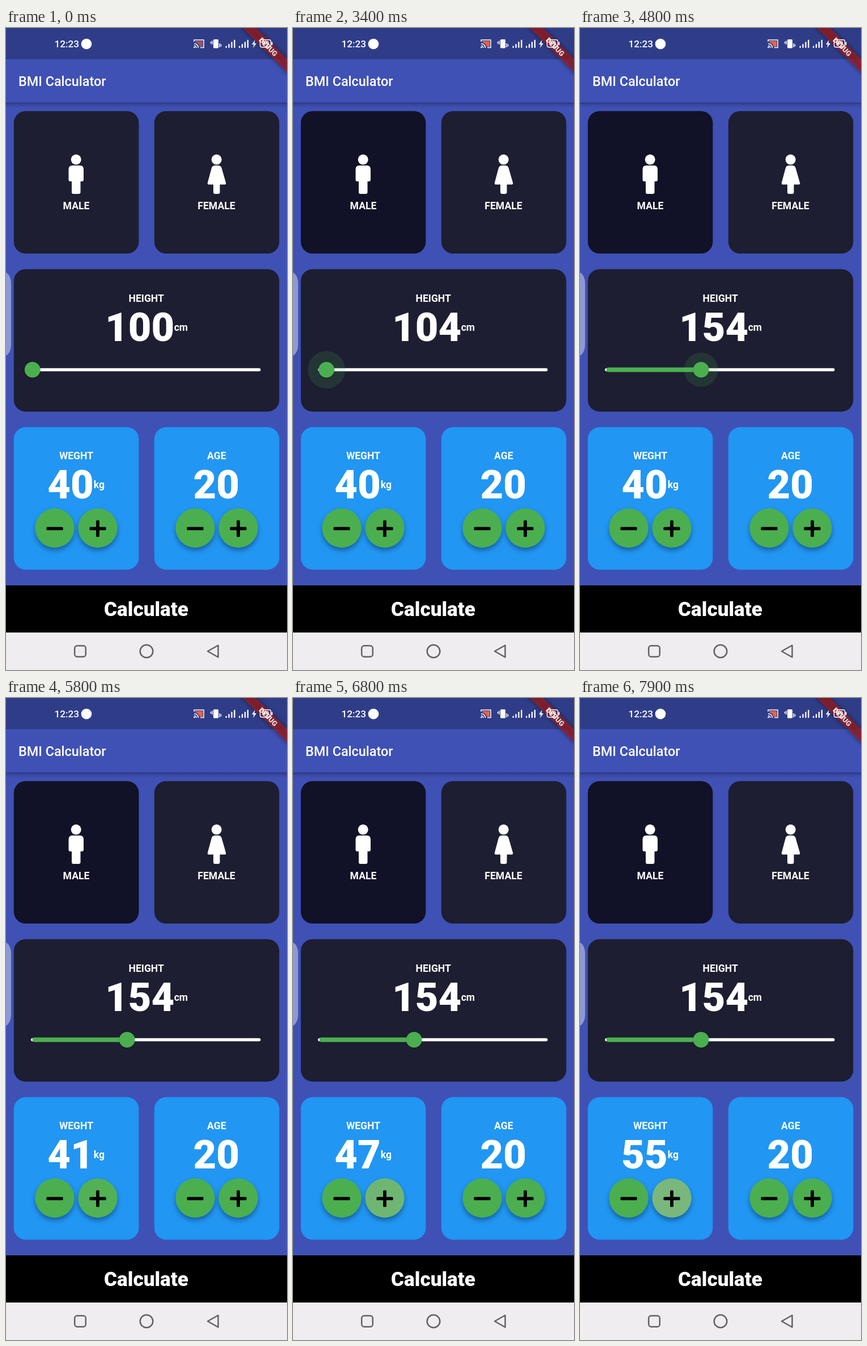
Recreate the animation shown at these times as an HTML page. Size 496x1130 px, loop 8000 ms.

```html
<!DOCTYPE html>
<html lang="en">
<head>
<meta charset="utf-8">
<title>BMI Calculator</title>
<style>
  html, body { margin: 0; width: 100%; height: 100%; overflow: hidden; background: #3f51b5; }
  svg { display: block; width: 496px; height: 1130px; }
  text { font-family: Roboto, sans-serif; fill: #fff; }
  .label { font-size: 17.57px; font-weight: 700; }
  .mid { text-anchor: middle; }
  .value { font-size: 70.3px; font-weight: 900; }
</style>
</head>
<body>
<svg id="stage" viewBox="0 0 496 1130">
  <defs>
    <linearGradient id="barShade" x2="0" y2="1">
      <stop stop-color="#000" stop-opacity=".3"/>
      <stop offset=".4" stop-color="#000" stop-opacity=".12"/>
      <stop offset="1" stop-color="#000" stop-opacity="0"/>
    </linearGradient>
    <filter id="lift" x="-30%" y="-30%" width="160%" height="170%">
      <feDropShadow dx="0" dy="5" stdDeviation="4" flood-color="#000" flood-opacity=".36"/>
    </filter>
    <filter id="thumbLift" x="-30%" y="-30%" width="160%" height="160%">
      <feDropShadow dx="0" dy="1" stdDeviation="1" flood-color="#000" flood-opacity=".4"/>
    </filter>
    <filter id="soft" x="-20%" y="-80%" width="140%" height="260%"><feGaussianBlur stdDeviation="4"/></filter>
  </defs>

  <!-- app bar and status bar -->
  <rect width="496" height="1130" fill="#3f51b5"/>
  <rect y="131" width="496" height="10" fill="url(#barShade)"/>
  <rect width="496" height="55" fill="#2f3d88"/>
  <text x="22" y="102" font-size="23.4" font-weight="500">BMI Calculator</text>

  <g id="cards"></g>

  <!-- people -->
  <g fill="#fff">
    <circle cx="123.7" cy="231.6" r="9"/>
    <path d="M117 242H130.500Q137 242 137 249V267Q137 270 134 270H131.500V289Q131.500 292 128.500 292H119Q116 292 116 289V270H113.500Q110.500 270 110.500 267V249Q110.500 242 117 242Z"/>
    <circle cx="371.7" cy="231.6" r="9"/>
    <path d="M369 242H374.500Q379 242 380.500 246L388 272Q389 275.500 385.500 275.500H377.500V289Q377.500 292 374.500 292H369Q366 292 366 289V275.500H358.500Q355 275.500 356 272L363 246Q364.500 242 369 242Z"/>
  </g>
  <g id="labels"></g>

  <!-- slider -->
  <rect x="44" y="598.7" width="405.500" height="5.600" rx="2.800" fill="#fff"/>
  <rect id="active" x="46.500" y="597.4" height="8.200" rx="4.100" fill="#4caf50"/>
  <circle id="halo" cy="601.500" fill="#4caf50" fill-opacity=".16"/>
  <circle id="thumb" cy="601.500" r="13.800" fill="#4caf50" filter="url(#thumbLift)"/>

  <g id="buttons"></g>
  <circle id="press" cx="162" cy="880" r="34.500" fill="#bfc4bf"/>
  <g id="signs"></g>

  <!-- side handle -->
  <path d="M0 430Q9 436 9 450V557Q9 571 0 577Z" fill="#c3c8e8" fill-opacity=".6"/>

  <!-- bottom bars -->
  <rect y="981" width="496" height="83" fill="#000"/>
  <text class="mid" x="247.500" y="1035" font-size="35.1" font-weight="900">Calculate</text>
  <rect y="1064" width="496" height="66" fill="#efedef"/>
  <g fill="none" stroke="#626166" stroke-width="2.500" stroke-linejoin="round">
    <rect x="121.200" y="1087.200" width="19.600" height="19.600" rx="4.500"/>
    <circle cx="248" cy="1097" r="11.300"/>
    <path d="M356 1097L374.500 1086.500V1107.500Z"/>
  </g>

  <!-- debug ribbon -->
  <g transform="translate(496 0) rotate(45)">
    <rect x="-60" y="38.600" width="120" height="16.500" fill-opacity=".5" filter="url(#soft)"/>
    <rect x="-60" y="38.600" width="120" height="16.500" fill="#b71c1c" fill-opacity=".627"/>
    <text class="mid" y="51.400" font-size="12.600" font-weight="900" fill-opacity=".85">DEBUG</text>
  </g>

  <!-- status icons -->
  <text x="85.500" y="34" font-size="17.200" font-weight="500">12:23</text>
  <circle cx="142" cy="28" r="9.300" fill="#fff"/>
  <g id="cast">
    <path id="castFill" d="M334 23H347V33H342Q341 27 334 25Z" fill="#f0603f"/>
    <path d="M332 24V21H349V34.500H343M332 27.500Q339 28 339.500 35M332 31Q335.500 31.500 336 35" fill="none" stroke="#fff" stroke-width="1.500"/>
    <circle cx="332.500" cy="34" r="1.300" fill="#fff"/>
  </g>
  <rect x="366" y="20" width="9" height="15.500" rx="1.500" fill="#fff"/>
  <path d="M364 22.500V29M361.500 24V27.500M377 27V34M379.500 28.500V32.500" stroke="#fff" stroke-width="1.500"/>
  <g id="signal" fill="#fff"></g>
  <path d="M439.500 21L434 29H437.500L436 35L442 27H438.500Z" fill="#fff"/>
  <rect x="448.500" y="20.800" width="19" height="13" rx="3" fill="none" stroke="#fff" stroke-width="1.400"/>
  <rect x="468.500" y="24.500" width="2" height="5.500" fill="#fff"/>
  <text class="mid" x="458" y="31.400" font-size="11" font-weight="700">99</text>
</svg>
<script>
const LOOP = 8000, STEP = 100;
const DARK = '#111227', IDLE = '#1d1e31', BLUE = '#2196f3';
const $ = id => document.getElementById(id);

function add(parent, tag, attrs, content = '') {
  const el = document.createElementNS('http://www.w3.org/2000/svg', tag);
  for (const key in attrs) el.setAttribute(key, attrs[key]);
  el.textContent = content;
  return $(parent).appendChild(el);
}
const card = (x, y, width, fill) =>
  add('cards', 'rect', { x, y, width, height: 250.8, rx: 20.7, fill });
const label = (text, x, y, cls = 'label mid') =>
  add('labels', 'text', { x, y, class: cls }, text);

const male = card(13.8, 146.2, 220.6, IDLE);
const female = card(261.8, 146.2, 220.6, IDLE);
card(13.8, 424.4, 468.6, IDLE);
card(13.8, 702.6, 220.6, BLUE);
card(261.8, 702.6, 220.6, BLUE);

label('MALE', 124, 319);
label('FEMALE', 371.5, 319);
label('HEIGHT', 247.7, 481.5);
label('WEGHT', 124, 758.5);
label('AGE', 371.8, 758.5);
label('cm', 296.7, 533, 'label');
label('kg', 154.8, 810, 'label');
label('20', 371.3, 828, 'value mid');
const height = label('100', 236.2, 551, 'value mid');
const weight = label('40', 114, 828, 'value mid');

for (const [cx, plus] of [[86, 0], [162, 1], [334, 0], [410, 1]]) {
  add('buttons', 'circle', { cx, cy: 880, r: 34.5, fill: '#4caf50', filter: 'url(#lift)' });
  add('signs', 'rect', { x: cx - 14.6, y: 878.3, width: 29.2, height: 5.8, rx: 1.5 });
  if (plus) add('signs', 'rect', { x: cx - 2.9, y: 866.6, width: 5.8, height: 29.2, rx: 1.5 });
}
for (const x of [387.5, 411])
  for (let i = 0; i < 4; i++)
    add('signal', 'rect', { x: x + i * 4.9, y: 31.5 - i * 3.6, width: 2.3, height: 3.5 + i * 3.6, rx: 1 });

// Rows of [start time, value]
const chosen = [[0, ''], [1200, 'male'], [1800, 'female'], [2400, 'male']];
const weightTimes = [5800, 6000, 6200, 6300, 6500, 6600, 6800, 6900,
  7100, 7200, 7400, 7500, 7600, 7800, 7900];
const haloSize = [[0, 0], [3400, 33], [4800, 30], [4900, 0]];
const pressTint = [[5700, 0], [5800, .06], [6200, .19], [6800, .31], [7900, .4]];

const held = (rows, t) => rows.filter(row => row[0] <= t).pop()[1];

function between(rows, t) {
  if (t <= rows[0][0]) return rows[0][1];
  const i = rows.findIndex(row => row[0] >= t);
  if (i < 0) return rows[rows.length - 1][1];
  const [t0, a] = rows[i - 1], [t1, b] = rows[i];
  return a + (b - a) * (t - t0) / (t1 - t0);
}

function heightAt(t) {
  if (t < 3400) return 100;
  const u = Math.min(1, (t - 3400) / 800);
  return Math.round(104 + 25 * (1 - Math.cos(Math.PI * u)));
}

function draw(now) {
  const t = Math.floor(now % LOOP / STEP) * STEP;
  const pick = held(chosen, t);
  male.setAttribute('fill', pick === 'male' ? DARK : IDLE);
  female.setAttribute('fill', pick === 'female' ? DARK : IDLE);

  const cm = heightAt(t), x = 46.7 + (cm - 100) * 402 / 130;
  height.textContent = cm;
  $('thumb').setAttribute('cx', x);
  $('halo').setAttribute('cx', x);
  $('halo').setAttribute('r', held(haloSize, t));
  $('active').setAttribute('width', x - 46.5);

  weight.textContent = 40 + weightTimes.filter(start => start <= t).length;
  $('press').setAttribute('opacity', between(pressTint, t));
  $('castFill').setAttribute('opacity', t < 100 ? .6 : 1);
}

function tick() {
  draw(performance.now());
  requestAnimationFrame(tick);
}
tick();
</script>
</body>
</html>
```
